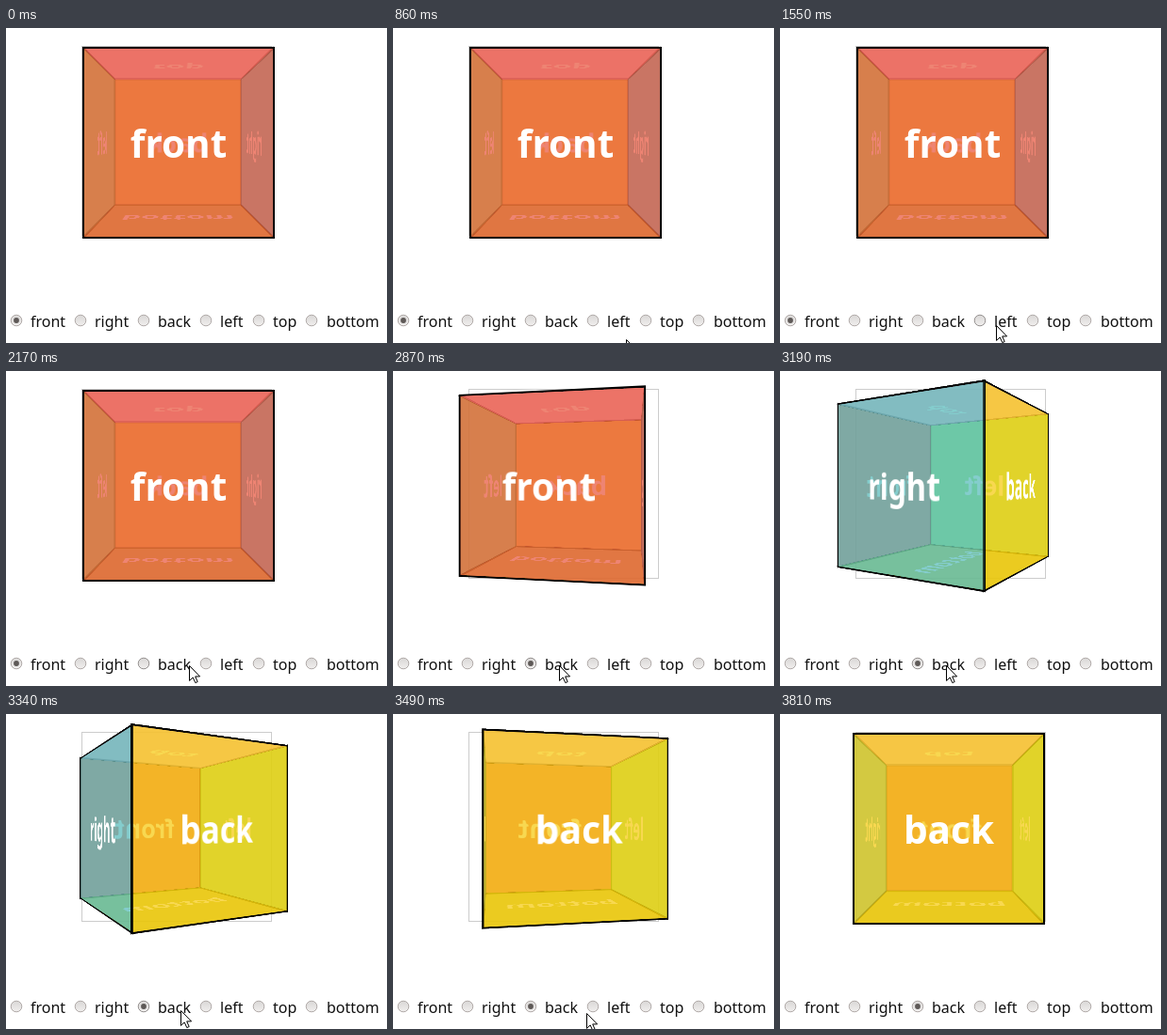
An HTML page for the animation above (6 s loop, 404 px wide and 335 px high).

```html
<!DOCTYPE html>
<html lang="en">
<head>
<meta charset="utf-8">
<title>Rotating cube</title>
<style>
  html, body { margin: 0; width: 100%; height: 100%; overflow: hidden; background: #fff; }
  body { position: relative; font-family: "Noto Sans", "Open Sans", sans-serif; }
  .scene {
    position: absolute; left: 80px; top: 19px; width: 200px; height: 200px;
    border: 1px solid #ccc; perspective: 400px;
  }
  .cube { position: relative; width: 200px; height: 200px; transform-style: preserve-3d; }
  .face {
    position: absolute; left: 0; top: 0; width: 200px; height: 200px;
    border: 2px solid #000; color: #fff;
    font-size: 40.5px; font-weight: bold; line-height: 202px; text-align: center;
  }
  svg { position: absolute; left: 0; top: 0; width: 404px; height: 335px; overflow: hidden; }
  text { font-size: 16px; }
</style>
</head>
<body>
<div class="scene"><div class="cube" id="cube"></div></div>
<svg viewBox="0 0 404 335">
  <defs>
    <linearGradient id="knob" x1="0" y1="0" x2="0" y2="1">
      <stop offset="0" stop-color="#d9d7d6"/>
      <stop offset="1" stop-color="#f1efee"/>
    </linearGradient>
  </defs>
  <g id="options"></g>
  <path id="cursor" d="M.5 .5V16.4L4.2 12.9L6.8 18.6L9.2 17.5L6.7 11.9H11.6Z" fill="#fff" stroke="#000"/>
</svg>
<script>
const LOOP = 6000, CLICK = 2720, TURN_START = 2796, TURN_MS = 1000;

// name, colour, placement, radio centre x, label x
const sides = [
  ['front', '231,80,56', 'rotateY(0deg)', 11, 26],
  ['right', '80,184,184', 'rotateY(90deg)', 79, 94],
  ['back', '245,200,6', 'rotateY(180deg)', 146, 161],
  ['left', '146,232,70', 'rotateY(-90deg)', 212, 227],
  ['top', '246,172,198', 'rotateX(90deg)', 268, 283],
  ['bottom', '190,190,25', 'rotateX(-90deg)', 324, 340]
];

// time, x, y of the pointer tip
const path = [
  [860, 247, 331], [1160, 235, 319], [1319, 235, 319], [1320, 231, 318],
  [1549, 231, 318], [1550, 229, 316], [1699, 229, 316], [1700, 225, 314],
  [1790, 225, 314], [2170, 194, 313], [2340, 194, 313], [2550, 176, 313],
  [3270, 176, 313], [3490, 205, 318], [3720, 238, 336]
];

const cube = document.getElementById('cube');
const cursor = document.getElementById('cursor');
const options = document.getElementById('options');

function add(tag, attrs, text) {
  const el = document.createElementNS('http://www.w3.org/2000/svg', tag);
  for (const key in attrs) el.setAttribute(key, attrs[key]);
  if (text) el.textContent = text;
  return options.appendChild(el);
}

const radios = {};
for (const [name, rgb, place, cx, x] of sides) {
  const face = document.createElement('div');
  face.className = 'face';
  face.textContent = name;
  face.style.background = `rgba(${rgb},.7)`;
  face.style.transform = `${place} translateZ(100px)`;
  cube.appendChild(face);

  radios[name] = {
    ring: add('circle', { cx, cy: 311, r: 5.8, fill: 'url(#knob)', stroke: '#b0aaa8' }),
    dot: add('circle', { cx, cy: 311, r: 2.9, fill: '#5e5957' })
  };
  add('text', { x, y: 318, fill: '#111' }, name);
}

const bezier = (a, b, u) => 3 * a * u * (1 - u) ** 2 + 3 * b * u * u * (1 - u) + u ** 3;

// cubic-bezier(.25, .1, .25, 1)
function ease(p) {
  if (p <= 0) return 0;
  if (p >= 1) return 1;
  let lo = 0, hi = 1;
  for (let i = 0; i < 24; i++) {
    const mid = (lo + hi) / 2;
    if (bezier(.25, .25, mid) < p) lo = mid; else hi = mid;
  }
  return bezier(.1, 1, lo);
}

function pointer(t) {
  const i = path.findIndex(k => k[0] > t);
  if (i < 1) return null;
  const [t0, x0, y0] = path[i - 1], [t1, x1, y1] = path[i];
  const p = (t - t0) / (t1 - t0);
  return [Math.round(x0 + (x1 - x0) * p), Math.round(y0 + (y1 - y0) * p)];
}

function hovered(t) {
  if (t >= 1100 && t < 1860) return 'left';
  if (t >= 2090 && t < 3420) return 'back';
  return '';
}

function draw(t) {
  const angle = -180 * ease((t - TURN_START) / TURN_MS);
  cube.style.transform = `translateZ(-100px) rotateY(${angle}deg)`;

  const chosen = t < CLICK ? 'front' : 'back', hover = hovered(t);
  for (const name in radios) {
    const { ring, dot } = radios[name];
    dot.setAttribute('visibility', name === chosen ? 'visible' : 'hidden');
    ring.setAttribute('stroke', name === hover ? '#959190' : '#b0aaa8');
  }

  const tip = pointer(t);
  cursor.setAttribute('visibility', tip ? 'visible' : 'hidden');
  if (tip) cursor.setAttribute('transform', `translate(${tip})`);
}

const start = performance.now();
function tick() {
  draw((performance.now() - start) % LOOP);
  requestAnimationFrame(tick);
}
draw(0);
requestAnimationFrame(tick);
</script>
</body>
</html>
```
